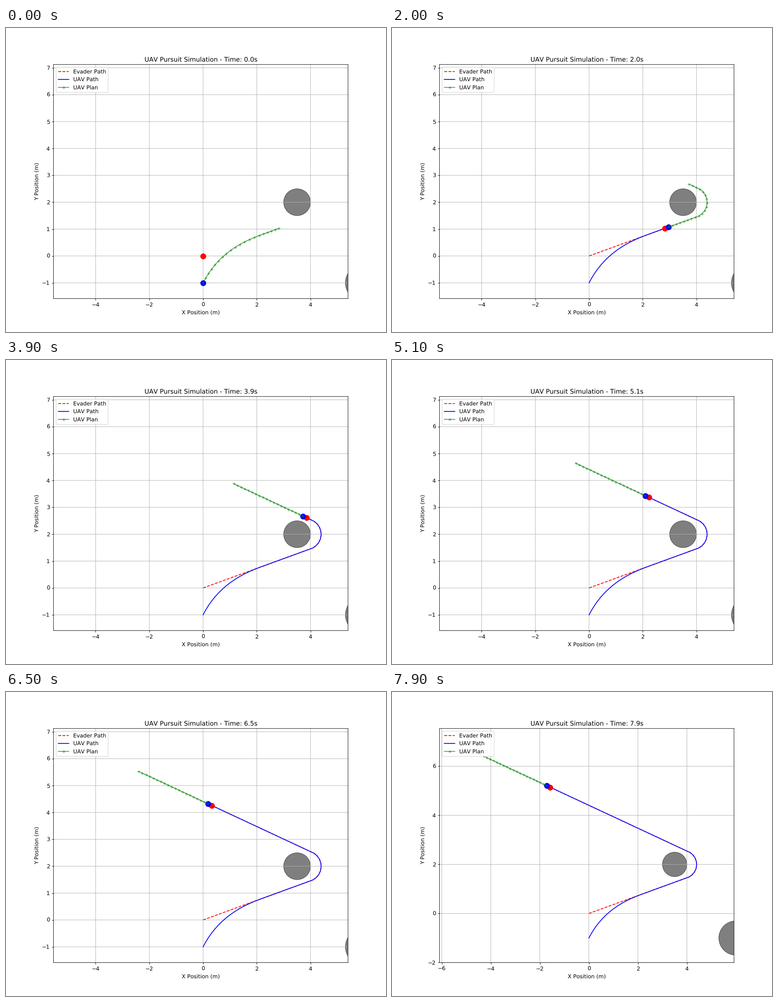
Animation of 837x669 px, one loop 8000 ms. Source, as a matplotlib script:

```python
import numpy as np
import matplotlib.pyplot as plt
from matplotlib.animation import FuncAnimation

DPI = 83.7
FRAMES, DT = 80, 0.1
HORIZON = 20
EVADER_STEP, UAV_STEP = 1.5 * DT, 2.0 * DT
OBSTACLES = [((3.5, 2), 0.5), ((6, -1), 0.7)]

# Smooth, unsnapped lines and letters
plt.rcParams.update({"path.snap": False, "text.hinting": "none",
                     "text.hinting_factor": 1})


def evader_path(steps):
    """Heads out at 20 degrees, then turns 15 degrees per step up to 155."""
    heading = np.radians(20 + 15 * np.clip(np.arange(steps) - 28, 0, 9))
    moves = EVADER_STEP * np.column_stack([np.cos(heading), np.sin(heading)])
    return np.vstack([[0, 0], np.cumsum(moves, axis=0)])


def chase(start, goals, rounds=3000):
    """Speed-limited moves with the least squared distance to the goals."""
    n = len(goals)
    rate = 1 / (2 * (n + 1) / np.pi) ** 2
    moves = np.zeros((n, 2))
    look, t = moves, 1.0
    for _ in range(rounds):
        error = start + np.cumsum(look, axis=0) - goals
        trial = look - rate * np.cumsum(error[::-1], axis=0)[::-1]
        size = np.hypot(*trial.T)[:, None]
        trial = trial * np.minimum(1, UAV_STEP / np.maximum(size, 1e-12))
        t_next = (1 + np.sqrt(1 + 4 * t * t)) / 2
        look = trial + (t - 1) / t_next * (trial - moves)
        moves, t = trial, t_next
    return start + np.cumsum(moves, axis=0)


evader = evader_path(101)
start = np.array([0.0, -1.0])
lead = chase(start, evader[2:HORIZON + 1])
uav = np.vstack([start, lead, evader[HORIZON + 1:]])

fig, ax = plt.subplots(figsize=((837 + 1e-6) / DPI, (669 + 1e-6) / DPI), dpi=DPI)
for center, radius in OBSTACLES:
    ax.add_patch(plt.Circle(center, radius, color="black", alpha=0.5))
evader_line, = ax.plot([], [], "r--", label="Evader Path")
uav_line, = ax.plot([], [], "b-", label="UAV Path")
evader_dot, = ax.plot([], [], "ro", markersize=10)
uav_dot, = ax.plot([], [], "bo", markersize=10)
plan_line, = ax.plot([], [], "g-+", markersize=5, alpha=0.7, label="UAV Plan")
ax.set_xlabel("X Position (m)")
ax.set_ylabel("Y Position (m)")
ax.grid(True)
ax.legend(loc="upper left")
title = ax.set_title("")

# View box around both full paths, with one metre to spare
points = np.vstack([evader, uav])
low, high = points.min(axis=0) - 1, points.max(axis=0) + 1
middle, span = (low + high) / 2, high - low
box = ax.get_position()
ratio = box.height * 669 / (box.width * 837)
right_edge = max(c[0] + r for c, r in OBSTACLES)


def set_view(plan):
    """Equal scales: fit the width until the contents get too wide for it."""
    too_wide = 1.05 * (right_edge - min(0, plan[:, 0].min())) > span[0]
    width = span[1] / ratio if too_wide else span[0]
    half = np.array([width, width * ratio]) / 2
    ax.set_xlim(middle[0] - half[0], middle[0] + half[0])
    ax.set_ylim(middle[1] - half[1], middle[1] + half[1])


def update(i):
    plan = uav[i:i + HORIZON]
    evader_line.set_data(*evader[:i + 1].T)
    uav_line.set_data(*uav[:i + 1].T)
    evader_dot.set_data(*evader[i:i + 1].T)
    uav_dot.set_data(*uav[i:i + 1].T)
    plan_line.set_data(*plan.T)
    title.set_text(f"UAV Pursuit Simulation - Time: {i * DT:.1f}s")
    set_view(plan)
    return evader_line, uav_line, evader_dot, uav_dot, plan_line, title


anim = FuncAnimation(fig, update, frames=FRAMES, interval=1000 * DT,
                     repeat=True, repeat_delay=0, blit=False)
plt.show()
```
